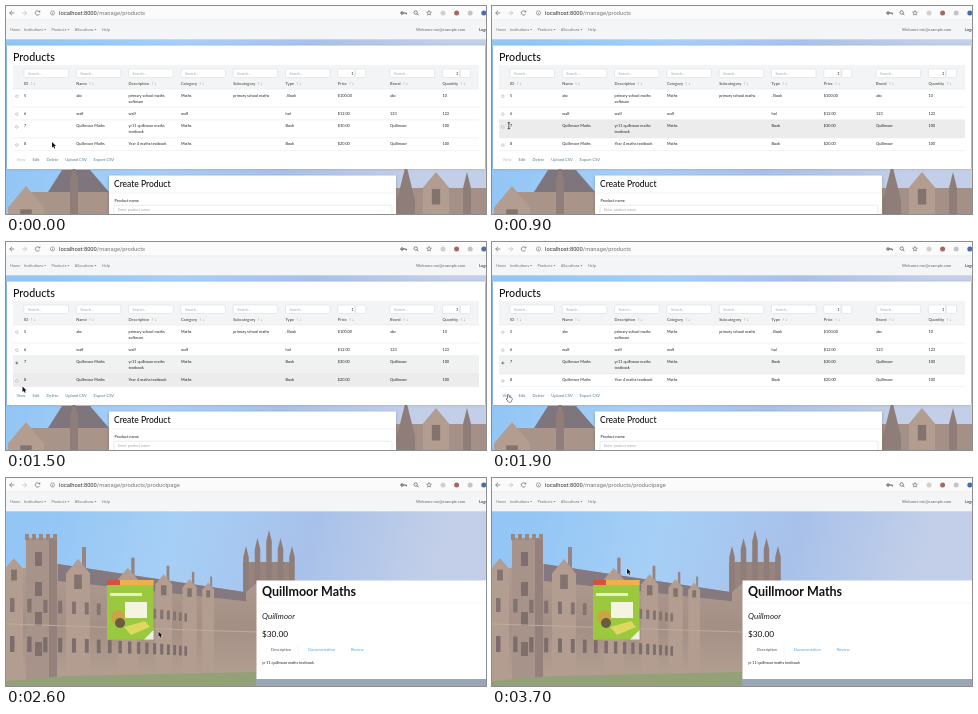
Recreate the animation shown at these times as an HTML page with a canvas. Size 480 px wide and 208 px high, loop 3800 ms.

```html
<!DOCTYPE html>
<html lang="en">
<head>
<meta charset="utf-8">
<title>Product manager</title>
<style>
html, body { margin: 0; width: 100%; height: 100%; overflow: hidden; background: #fff; }
canvas { display: block; width: 480px; height: 208px; }
</style>
</head>
<body>
<canvas id="stage"></canvas>
<script>
const W = 480, H = 208, LOOP = 3800, PAGE_AT = 2000, SELECT_AT = 1200;
const canvas = document.getElementById('stage');
const ctx = canvas.getContext('2d');
const dpr = window.devicePixelRatio || 1;
canvas.width = W * dpr;
canvas.height = H * dpr;

const LATO = 'Lato, "Open Sans", sans-serif';
const UI = 'Roboto, Inter, sans-serif';
const ARROWS = '"DejaVu Sans", sans-serif';
const HEADS = ['ID', 'Name', 'Description', 'Category', 'Subcategory', 'Type', 'Price', 'Brand', 'Quantity'];
const colX = i => 18 + 52.3 * i;

// cells in column order; "|" breaks a line
const PRODUCTS = [
  '5,abc,primary school maths|software,Maths,primary school maths,• Book,$100.00,abc,10',
  '6,walf,walf,walf,,hol,$12.00,123,123',
  '7,Quillmoor Maths,yr11 quillmoor maths|textbook,Maths,,Book,$30.00,Quillmoor,100',
  '8,Quillmoor Maths,Year 4 maths textbook,Maths,,Book,$20.00,Quillmoor,100'
];
let nextTop = 83;
const rows = PRODUCTS.map(p => {
  const top = nextTop, height = p.includes('|') ? 18 : 12.8;
  nextTop += height;
  return { top, height, cells: p.replace('•', ';').split(',').map(c => c.replace(';', ',')) };
});

const STOPS = [
  { t: 0, x: 46, y: 136 },
  { t: 800, x: 18, y: 119 },
  { t: 1200, x: 10.5, y: 120 },
  { t: 1500, x: 16.5, y: 144.4 },
  { t: 1800, x: 15.5, y: 153 },
  { t: 2100, x: 16, y: 152.5 },
  { t: 2600, x: 152.5, y: 153.5 },
  { t: 3200, x: 135, y: 90.5 }
];

function rect(x, y, w, h, fill) {
  ctx.fillStyle = fill;
  ctx.fillRect(x, y, w, h);
}

function trace(pts) {
  ctx.beginPath();
  for (let i = 0; i < pts.length; i += 2) ctx.lineTo(pts[i], pts[i + 1]);
}

function poly(pts, fill) {
  trace(pts);
  ctx.fillStyle = fill;
  ctx.fill();
}

function line(pts, color, width = 0.5) {
  trace(pts);
  ctx.strokeStyle = color;
  ctx.lineWidth = width;
  ctx.stroke();
}

function dot(x, y, r, fill, stroke, width = 0.5) {
  ctx.beginPath();
  ctx.arc(x, y, r, 0, Math.PI * 2);
  if (fill) { ctx.fillStyle = fill; ctx.fill(); }
  if (stroke) { ctx.strokeStyle = stroke; ctx.lineWidth = width; ctx.stroke(); }
}

// returns the right edge
function text(str, x, y, size, color, style = '', family = LATO) {
  ctx.font = `${style} ${size}px ${family}`;
  ctx.fillStyle = color;
  ctx.fillText(str, x, y);
  return x + ctx.measureText(str).width;
}

function gradient(x0, y0, x1, y1, ...colors) {
  const g = ctx.createLinearGradient(x0, y0, x1, y1);
  colors.forEach((c, i) => g.addColorStop(i / (colors.length - 1), c));
  return g;
}

function card(x, y, w, h) {
  ctx.save();
  ctx.shadowColor = 'rgba(0,0,0,.25)';
  ctx.shadowBlur = 3 * dpr;
  rect(x, y, w, h, '#fff');
  ctx.restore();
}

function field(x, y, w, h, hint = '') {
  ctx.beginPath();
  ctx.roundRect(x, y, w, h, 1.2);
  ctx.fillStyle = '#fff';
  ctx.fill();
  ctx.strokeStyle = '#d3d6d9';
  ctx.lineWidth = 0.5;
  ctx.stroke();
  text(hint, x + 4, y + 6.2, 3.7, '#a5a8ab');
}

function backArrow(x, dir, color) {
  line([x - 2.3 * dir, 7, x + 2.3 * dir, 7], color, 0.7);
  line([x, 4.8, x - 2.3 * dir, 7, x, 9.2], color, 0.7);
}

function browserBar(path) {
  const y = 7;
  rect(0, 0, W, 14, '#fbfbfb');
  backArrow(6, 1, '#666');
  backArrow(18.5, -1, '#bbb');
  ctx.beginPath();
  ctx.arc(31.5, y, 2.2, 0.4, 5.6);
  ctx.strokeStyle = '#666';
  ctx.lineWidth = 0.7;
  ctx.stroke();
  poly([32.3, 6.2, 34.2, 6.2, 34.2, 4.3], '#666');
  dot(46.5, y, 2.1, null, '#777', 0.6);
  line([46.5, 6.6, 46.5, 8.3], '#777', 0.7);

  const end = text('localhost:8000', 53, 9.1, 5.75, '#333', '', UI);
  text(path, end, 9.1, 5.75, '#777', '', UI);

  dot(396, y, 1.2, null, '#444', 0.9);
  line([397.2, y, 400.3, y, 400.3, y + 1.4], '#444', 0.9);
  dot(409.7, y - 0.5, 1.7, null, '#555', 0.7);
  line([411, y + 0.8, 412.4, y + 2.2], '#555', 0.8);
  const star = [];
  for (let i = 0; i < 11; i++) {
    const a = i * Math.PI / 5 - Math.PI / 2, r = i % 2 ? 1.1 : 2.6;
    star.push(423 + r * Math.cos(a), y + r * Math.sin(a));
  }
  line(star, '#666', 0.6);
  ['#d3cfc9', '#a9665c', '#c3c6c8', '#4a6cb0'].forEach((c, i) => dot(437 + 13.6 * i, y, 2.5, c));
}

function navBar() {
  rect(0, 14, W, 19.3, '#f4f5f7');
  line([0, 13.8, W, 13.8], '#dcdcdc');
  let x = 4;
  for (const item of ['Home', 'Institutions▾', 'Products▾', 'Allocations▾', 'Help']) {
    const menu = item.endsWith('▾');
    const end = text(item.replace('▾', ''), x, 25.2, 3.85, '#777');
    if (menu) poly([end + 1, 23.1, end + 3, 23.1, end + 2, 24.3], '#777');
    x = end + (menu ? 8.4 : 3.7);
  }
  text('Welcome me@example.com', 410, 25.2, 4, '#666');
  text('Logout', 473, 25.2, 4, '#222');
}

function sky() {
  rect(0, 33, W, H - 33, gradient(40, 33, 420, 130, '#93c6f5', '#a6cff6', '#a8c1ea', '#c3cfe8'));
}

function spire(x, top, w) {
  poly([x, top, x + w / 2, top + w * 2, x + w / 2, H, x - w / 2, H, x - w / 2, top + w * 2], '#8f7d7a');
}

function gable(x, top, w) {
  poly([x, top, x + w / 2, top + w * 0.6, x + w / 2, H, x - w / 2, H, x - w / 2, top + w * 0.6], '#b39d90');
  rect(x - w * 0.16, top + w * 0.65, w * 0.32, w * 0.6, '#83736f');
}

function gateTower() {
  rect(20, 60, 31, H - 60, '#a8938a');
  rect(43, 60, 8, H - 60, '#94817c');
  for (let i = 0; i < 5; i++) rect(19 + i * 7, 56, 4, 6, '#9a8780');
  for (let y = 74; y < 180; y += 30) rect(29, y, 7, 14, '#7f706d');
}

function spireTower() {
  rect(237, 84, 51, 40, '#97847d');
  for (let i = -2; i <= 2; i++) spire(263 + i * 11.5, 52 + 8 * Math.abs(i), 5.5);
}

function campus() {
  sky();
  const eaves = x => 86 + (x - 52) * 0.15;
  spireTower();
  poly([0, 92, 52, eaves(52), 240, eaves(240), 252, 104, 252, H, 0, H],
    gradient(0, 90, 0, H, '#b09b90', '#a48f84', '#b5a294'));
  poly([52, eaves(52), 240, eaves(240), 240, eaves(240) + 9, 52, eaves(52) + 17], '#85797f');
  gable(8, 80, 18);
  // wings shrink towards the far end
  for (let i = 0; i < 5; i++) {
    const s = 0.84 ** i, x = 250 - 178 * 0.72 ** i;
    rect(x + 4 * s, eaves(x) - 20 * s, 4 * s, 26 * s, '#978380');
    gable(x, eaves(x) - 8 * s, 24 * s);
  }
  gateTower();
  for (let i = 0; i < 18; i++) {
    const x = 250 - 246 * 0.93 ** i;
    const s = 0.97 ** i;
    rect(x, 120 + i * 0.9, 4.5 * s, 14 * s, '#837370');
    rect(x, 158 + i * 0.6, 4.5 * s, 16 * s, '#7b6d6b');
  }
  line([0, 146, 250, 154], '#bfab9c', 1.2);
  poly([0, 203, 60, 198, 250, 194, 250, H, 0, H], '#92a276');
  rect(250, 200, 230, 8, '#9aa6b8');
}

function closeUp() {
  sky();
  rect(20, 186, 83, 22, '#a99489');
  poly([42, 186, 56, 164, 84, 164, 103, 186], '#7f757d');
  gable(20, 180, 36);
  spire(68, 158, 8);
  rect(390, 182, 90, 26, '#a49086');
  spire(400, 158, 18);
  gable(430, 166, 26);
  spire(461, 166, 8);
}

function listPage(t, tip) {
  closeUp();
  card(1, 39.5, 478, 123.5);
  text('Products', 7, 54.8, 10.7, '#111', '500');
  rect(7, 59, 466, 24, '#f3f4f5');
  HEADS.forEach((head, i) => {
    const x = colX(i);
    if (head === 'Price' || head === 'Quantity') {
      field(x, 63, 17, 8.5);
      text('↕', x + 13, 68.8, 4, '#444', '', ARROWS);
      field(x + 18, 63, 10, 8.5);
    } else {
      field(x, 63, 44.5, 8.5, 'Search...');
    }
    const end = text(head, x, 78.7, 4, '#555', '600');
    text('↑↓', end + 1.8, 78.5, 3.6, '#aaa', '', ARROWS);
  });

  rows.forEach(({ top, height, cells }, i) => {
    const chosen = i === 2 && t >= SELECT_AT;
    const hover = t > 0 && tip.y >= top && tip.y < top + height;
    if (chosen || hover) rect(7, top, 466, height, hover ? '#ececec' : '#f0f1f1');
    line([7, top, 473, top], '#dfe2e5');
    dot(10.8, top + 7.2, 1.3, '#fff', '#999');
    if (chosen) dot(10.8, top + 7.2, 0.8, '#333');
    cells.forEach((cell, c) => cell.split('|').forEach((s, n) =>
      text(s, colX(c), top + 7.6 + n * 6, 3.85, '#222')));
  });
  line([7, nextTop, 473, nextTop], '#e5e7e9');

  let x = 10.5;
  for (const label of ['View', 'Edit', 'Delete', 'Upload CSV', 'Export CSV']) {
    const off = label === 'View' && t < SELECT_AT;
    x = 7 + text(label, x, 155.2, 4.05, off ? '#a9bcc3' : '#527b8b');
  }

  card(103, 169.5, 287, 45);
  text('Create Product', 108, 181, 8.5, '#111', '500');
  line([103, 187, 390, 187], '#e5e5e5');
  text('Product name', 108.5, 195.7, 4, '#222');
  field(108, 199.2, 278, 10, 'Enter product name');
}

function book() {
  rect(101, 102, 46.5, 59.5, '#9ac83f');
  rect(101, 102, 46.5, 5, '#eeb04a');
  rect(101, 102, 13, 5, '#d5513f');
  rect(104, 115, 32, 3, '#e6f0c4');
  rect(119, 124, 22, 16, '#f5f4e2');
  dot(112, 139, 7, '#c9a546');
  dot(114, 145, 5, '#6a5c3f');
  poly([118, 149, 139, 143, 144, 149, 125, 157], '#dcd860');
  poly([147.5, 152, 147.5, 161.5, 138, 161.5], '#eef0e6');
}

function productPage() {
  campus();
  book();
  rect(250.5, 102.5, 230, 98.5, '#fff');
  text('Quillmoor Maths', 256, 117.7, 12.5, '#111', '700');
  line([250.5, 125, W, 125], '#eceeef');
  text('Quillmoor', 256, 141, 8, '#222', 'italic');
  text('$30.00', 256, 158.8, 8.3, '#111');
  line([292, 167, 292, 177], '#e3e5e7');
  text('Description', 265, 173.3, 3.95, '#555');
  text('Documentation', 302, 173.3, 3.95, '#4fa3d8');
  text('Review', 345, 173.3, 3.95, '#4fa3d8');
  text('yr 11 quillmoor maths textbook', 256, 185.9, 3.75, '#222');
}

function pointerAt(t) {
  const i = STOPS.findIndex(s => s.t > t);
  if (i < 0) return STOPS[STOPS.length - 1];
  const a = STOPS[i - 1], b = STOPS[i];
  const u = (t - a.t) / (b.t - a.t), k = u * u * (3 - 2 * u);
  return { x: a.x + (b.x - a.x) * k, y: a.y + (b.y - a.y) * k };
}

function drawPointer(t, { x, y }) {
  ctx.save();
  ctx.translate(x, y);
  if (t >= 800 && t < 1000) {
    line([0, -2.5, 0, 3.5], '#222', 0.7);
    for (const end of [-2.5, 3.5]) line([-1.3, end, 1.3, end], '#222', 0.7);
  } else if (t >= 1800 && t < PAGE_AT) {
    const hand = [0, 0, 1, 0, 1.3, 2.4, 4.2, 3, 4.2, 5.2, 3.3, 7, 0.8, 7, -1.3, 4, 0, 4, 0, 0];
    line(hand, '#222', 1);
    poly(hand, '#fff');
  } else {
    const arrow = [0, 0, 0, 5.6, 1.3, 4.5, 2.2, 6.4, 3.1, 6, 2.3, 4.1, 4, 4.1, 0, 0];
    line(arrow, '#fff', 0.9);
    poly(arrow, '#111');
  }
  ctx.restore();
}

function draw(now) {
  const t = Math.floor((now % LOOP) / 100) * 100;
  const tip = pointerAt(t);
  const onList = t < PAGE_AT;
  ctx.setTransform(dpr, 0, 0, dpr, 0, 0);
  if (onList) listPage(t, tip);
  else productPage();
  browserBar('/manage/products' + (onList ? '' : '/productpage'));
  navBar();
  drawPointer(t, tip);
}

const start = performance.now();
function tick() {
  draw(performance.now() - start);
  requestAnimationFrame(tick);
}
tick();
</script>
</body>
</html>
```
